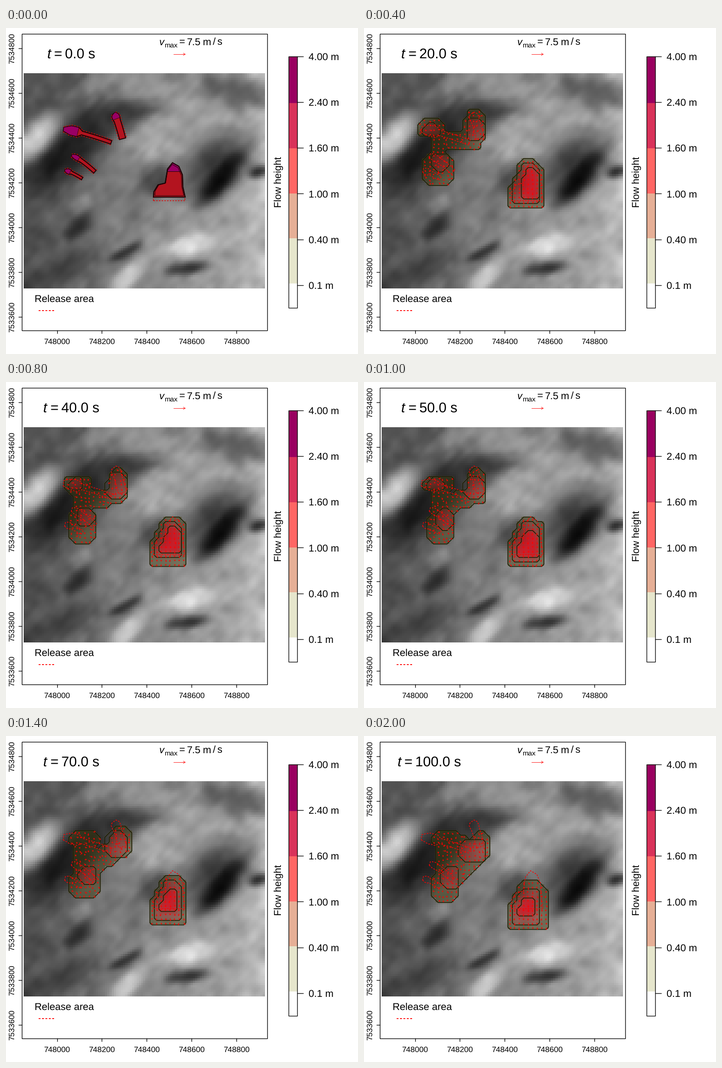
Write a matplotlib script that moves like this. It is 776 px wide and 721 px high and loops after 2.2 s.

```python
import numpy as np
import matplotlib.pyplot as plt
from matplotlib.animation import FuncAnimation
from matplotlib.collections import LineCollection
from matplotlib.patches import Polygon, Rectangle
from matplotlib.path import Path

W, H, DPI = 776, 721, 64
PT = 72 / DPI
L, R, T, B = 39, 570.5, 100, 576
NX, NY = 107, 96
RED, BLACK, DARK = "#ff0000", "black", "#1c0406"

plt.rcParams["font.family"] = "Liberation Sans"
plt.rcParams["text.hinting"] = "none"
fig = plt.figure(figsize=(W / DPI, H / DPI), dpi=DPI, facecolor="white")
ax = fig.add_axes([0, 0, 1, 1])
ax.axis("off")

# Fine grid for the terrain; the flow lives on cells twice as wide
CELL = (R - L) / NX
X, Y = np.meshgrid(L + CELL * (np.arange(NX) + .5), T + CELL * (np.arange(NY) + .5))
FX, FY = np.meshgrid(L + CELL * (2 * np.arange(NX // 2 + 1) + 1),
                     T + CELL * (2 * np.arange(NY // 2) + 1))


def blur(a, n=1):
    for _ in range(n):
        p = np.pad(a, 1, mode="edge")
        a = (p[:-2, 1:-1] + p[1:-1, 1:-1] + p[2:, 1:-1]) / 3
        p = np.pad(a, 1, mode="edge")
        a = (p[1:-1, :-2] + p[1:-1, 1:-1] + p[1:-1, 2:]) / 3
    return a


# Hill shade: x, y, half length, half width, tilt in degrees, grey
SLOPES = [
    (90, 140, 85, 50, 0, .32), (500, 140, 90, 42, -12, .36),
    (350, 150, 110, 45, -15, .56), (450, 205, 125, 35, -25, .62),
    (200, 120, 65, 18, 30, .60), (225, 200, 110, 36, 8, .21),
    (305, 186, 36, 10, 10, .24), (130, 285, 125, 52, 38, .12),
    (62, 246, 75, 30, 48, .78), (330, 245, 72, 50, 25, .66),
    (255, 350, 60, 60, 0, .47), (335, 335, 45, 32, 35, .25),
    (465, 305, 92, 60, 42, .24), (472, 335, 75, 24, 52, .03),
    (557, 318, 24, 13, 20, .17), (160, 438, 38, 18, 45, .18),
    (165, 388, 26, 18, 40, .53), (125, 535, 80, 32, 25, .24),
    (262, 496, 40, 11, 30, .16), (275, 545, 62, 22, 40, .76),
    (402, 482, 68, 22, 18, .87), (398, 533, 46, 14, 8, .19),
]


def make_terrain():
    rng = np.random.default_rng(7)
    g = .31 + .41 * (X - L) / (R - L)
    for x, y, a, b, tilt, grey in SLOPES:
        c, s = np.cos(np.radians(tilt)), np.sin(np.radians(tilt))
        dx, dy = X - x, Y - y
        r2 = ((dx * c - dy * s) / a) ** 2 + ((dx * s + dy * c) / b) ** 2
        w = .95 * np.exp(-r2 ** 1.6)
        g = g * (1 - w) + grey * w
    noise = rng.normal(size=g.shape)
    streak = sum(np.roll(noise, (-k, k), (0, 1)) for k in range(-3, 4)) / 7 ** .5
    lumps = blur(rng.normal(size=g.shape), 5)
    g = blur(g) + (.025 * blur(streak) + .03 * lumps / lumps.std()) * (.4 + g)
    return np.clip(g, .02, .9)


terrain = np.repeat(make_terrain()[:, :, None], 3, axis=2)


# Flow shapes; every number moves steadily from its 20 s to its 100 s value
def move(start, end, t):
    return np.array(start) + (np.array(end) - np.array(start)) * (t - 20) / 80


def box(x0, y0, x1, y1):
    dx = np.abs(FX - (x0 + x1) / 2) / ((x1 - x0) / 2)
    dy = np.abs(FY - (y0 + y1) / 2) / ((y1 - y0) / 2)
    return (np.maximum(dx, dy) < 1) & (dx + dy < 1.5)


def capsule(x0, y0, x1, y1, r):
    ux, uy = x1 - x0, y1 - y0
    s = np.clip(((FX - x0) * ux + (FY - y0) * uy) / (ux ** 2 + uy ** 2), 0, 1)
    return np.hypot(FX - x0 - s * ux, FY - y0 - s * uy) < r


def bell(x0, y0, x1, y1):
    shape = np.array([(0, 1), (0, .58), (.22, .24), (.35, 0), (.76, 0),
                      (1, .17), (1, 1)])
    edge = Path((x0, y0) + shape * (x1 - x0, y1 - y0))
    return edge.contains_points(np.c_[FX.ravel(), FY.ravel()]).reshape(FX.shape)


def union(t, parts):
    return np.any([f(*move(a, b, t)) for f, a, b in parts], axis=0).astype(float)


WEST = (box, (129, 211, 168, 241), (158, 219, 187, 249))
SOUTH_CORE = (bell, (343, 311, 385, 375), (337, 360, 378, 399))
AREA = [
    (box, (120, 202, 182, 243), (150, 212, 225, 250)),
    (box, (220, 183, 268, 263), (238, 211, 279, 275)),
    (box, (130, 278, 201, 349), (150, 300, 206, 370)),
    (capsule, (165, 235, 165, 300, 18), (182, 230, 178, 340, 25)),
    (capsule, (170, 250, 245, 250, 17), (185, 318, 255, 245, 27)),
    (bell, (318, 291, 397, 399), (313, 320, 403, 428)),
]
MIDDLE = [
    (box, (226, 196, 263, 251), (211, 225, 271, 280)),
    (box, (148, 277, 187, 318), (169, 290, 211, 340)),
    (bell, (326, 300, 390, 385), (328, 335, 388, 414)),
]

# Overlay colour and opacity by flow level
LEVELS = [1, 2, 3]
TINT = [(.25, .24, .04), (.58, .17, .12), (.83, .06, .11)]
OPACITY = [.42, .55, .85]

# Release: tracks as start, end, head and tail half widths
TRACKS = [((127, 224), (232, 253), 10, 4), ((238, 189), (257, 245), 8, 7),
          ((145, 282), (196, 318), 5, 4), ((130, 315), (168, 333), 5, 3)]
SOUTH_BODY = np.array([(325, 374), (326, 362), (335, 347), (351, 343),
                       (356, 312), (367, 298), (381, 306), (389, 325),
                       (390, 352), (395, 374)])


def strip(start, end, head, tail, s0=0, s1=1, margin=0):
    s = np.linspace(s0, s1, 14)
    x = start[0] + (end[0] - start[0]) * s
    y = start[1] + (end[1] - start[1]) * s ** 1.3
    dx, dy = np.gradient(x), np.gradient(y)
    w = np.where(s < .35, head, tail) * np.clip(.4 + 4 * s, 0, 1) + margin
    nx, ny = -dy / np.hypot(dx, dy) * w, dx / np.hypot(dx, dy) * w
    return np.r_[np.c_[x + nx, y + ny], np.c_[x - nx, y - ny][::-1]]


live = []


def keep(artist):
    live.append(artist)
    return artist


def shape(p, width=0, fc="none", ec=DARK, **kw):
    return keep(ax.add_patch(Polygon(p, fc=fc, ec=ec if width else "none",
                                     lw=width * PT, **kw)))


def line(x, y, width=1.4, color=BLACK, **kw):
    return ax.plot(x, y, color=color, lw=width * PT, **kw)[0]


def text(x, y, s, size, **kw):
    return ax.text(x, y, s, fontsize=size * PT, va="baseline",
                   rotation_mode="anchor", **kw)


def arrow_lines(x, y, u, v, head=2.8):
    tip = np.array([x + u, y + v])
    ang = np.arctan2(v, u)
    barbs = [tip - head * np.array([np.cos(ang + d), np.sin(ang + d)])
             for d in (.55, -.55)]
    return [[(x, y), tip], [barbs[0], tip, barbs[1]]]


def draw_release(t):
    style = dict(ec=RED if t else "#e00000", ls=(0, (2.2, 1.8)), zorder=4)
    for track in TRACKS:
        shape(strip(*track, margin=2), 1.5, **style)
    drop = SOUTH_BODY + np.where(SOUTH_BODY[:, 1:] > 370, (0, 8), (0, 0))
    shape(drop, 1.5, **style)


def draw_start():
    for track in TRACKS:
        shape(strip(*track), 2, "#b3141f", zorder=5)
        shape(strip(*track, s1=.3), .8, "#990064", zorder=5.1)
    body = shape(SOUTH_BODY, 2.2, "#b3141f", zorder=5)
    top = Rectangle((350, 290), 45, 27, fc="#990064", ec=DARK, lw=PT, zorder=5.1)
    keep(ax.add_patch(top)).set_clip_path(body)
    mid = SOUTH_BODY.mean(0)
    shape(mid + (SOUTH_BODY - mid) * .91, 1, zorder=5.2)
    shape(SOUTH_BODY, 2, zorder=5.2)


def outline(m):
    for color, width, alpha in (("#55551c", 2.6, .6), (BLACK, 1, 1)):
        keep(ax.contour(FX, FY, m, [.5], colors=[color], alpha=alpha,
                        linewidths=width * PT, zorder=3))


def draw_arrows(area, t):
    rng = np.random.default_rng(t)
    segs = []
    for x, y in zip(FX[area > 0], FY[area > 0]):
        south = x > 300
        heading = np.pi / 2 if south else 1.7 if x > 215 else .75
        heading += rng.normal(0, .25 if south else .6)
        size = rng.uniform(2.5, 6)
        x, y = (x, y) if south else (x, y) + rng.uniform(-2, 2, 2)
        segs += arrow_lines(x, y, size * np.cos(heading), size * np.sin(heading))
    keep(ax.add_collection(LineCollection(segs, colors=RED,
                                          linewidths=PT, zorder=5)))


def draw_flow(t):
    area = union(t, AREA)
    middle = union(t, MIDDLE + [WEST] * (t < 65))
    core = union(t, [SOUTH_CORE])
    for m in (area, middle, core):
        outline(m)
    fine = [np.kron(m, np.ones((2, 2)))[:, :NX] for m in (area, middle, core)]
    level = np.maximum(blur(sum(fine), 2), 1)
    a = (np.interp(level, LEVELS, OPACITY) * fine[0])[..., None]
    rgb = np.dstack([np.interp(level, LEVELS, ch) for ch in zip(*TINT)])
    ground.set_data(terrain * (1 - a) + rgb * a)
    draw_arrows(area, t)


def draw(i):
    while live:
        live.pop().remove()
    t = 10 * i
    value = f"{t:.1f} s"
    shift = 8.5 * (len(value) - 5)
    t_name.set_x(90.5 - shift)
    t_equal.set_x(114.5 - shift)
    t_value.set_x(197 + shift)
    t_value.set_text(value)
    draw_release(t)
    if t:
        draw_flow(t)
    else:
        ground.set_data(terrain)
        draw_start()
    return live


ground = ax.imshow(terrain, extent=(L, R, B, T), origin="upper",
                   interpolation="nearest", aspect="auto", zorder=1)

# Map frame and ticks
ax.add_patch(Rectangle((34.5, 13), 541, 655.5, fill=False, ec=BLACK, lw=1.4 * PT))
for k in range(5):
    x = 112.5 + 98.9 * k
    line([x, x], [668.5, 674.5])
    text(x, 700, str(748000 + 200 * k), 17.4, ha="center")
for k in range(7):
    y = 639 - 98.95 * k
    line([28, 34.5], [y, y])
    text(19, y, str(7533600 + 200 * k), 17.4, ha="center", rotation=90)

# Heading, speed key and release key
t_name = text(90.5, 67, "t", 30.8, style="italic")
t_equal = text(114.5, 67, "=", 30.8, ha="center")
t_value = text(197, 67, "0.0 s", 30.8, ha="right")
text(338, 38, "v", 22, style="italic")
text(349.5, 43, "max", 15.4)
text(388.5, 38, "=", 22, ha="center")
for x, s in ((398.5, "7.5"), (434, "m"), (455.5, "/"), (465, "s")):
    text(x, 38, s, 22)
ax.add_collection(LineCollection(arrow_lines(369, 58, 26, 0, 5), colors=RED,
                                 linewidths=.9 * PT))
text(63, 607, "Release area", 22)
line([72, 109], [625, 625], 2, RED, ls=(0, (2, 1.75)), dash_capstyle="butt")

# Colour bar
COLORS = ["#990060", "#d9325a", "#ff6664", "#e6af96", "#e6e6cc", "#ffffff"]
LABELS = ["4.00", "2.40", "1.60", "1.00", "0.40", "0.1"]
for k, (color, label) in enumerate(zip(COLORS, LABELS)):
    y = 62.5 + 101.3 * k
    top = 66.5 + 99.7 * k if k else y
    ax.add_patch(Rectangle((622.5, top), 19, 619 - top, fc=color, ec="none"))
    line([641.5, 655], [y, y])
    text(667, y + 8, label + " m", 22)
ax.add_patch(Rectangle((622.5, 62.5), 19, 556.5, fill=False, ec=BLACK, lw=1.4 * PT))
text(607, 341, "Flow height", 22, rotation=90, ha="center")

ax.set_xlim(0, W)
ax.set_ylim(H, 0)

anim = FuncAnimation(fig, draw, frames=11, interval=200, repeat=True,
                     repeat_delay=0, blit=False)
plt.show()
```
